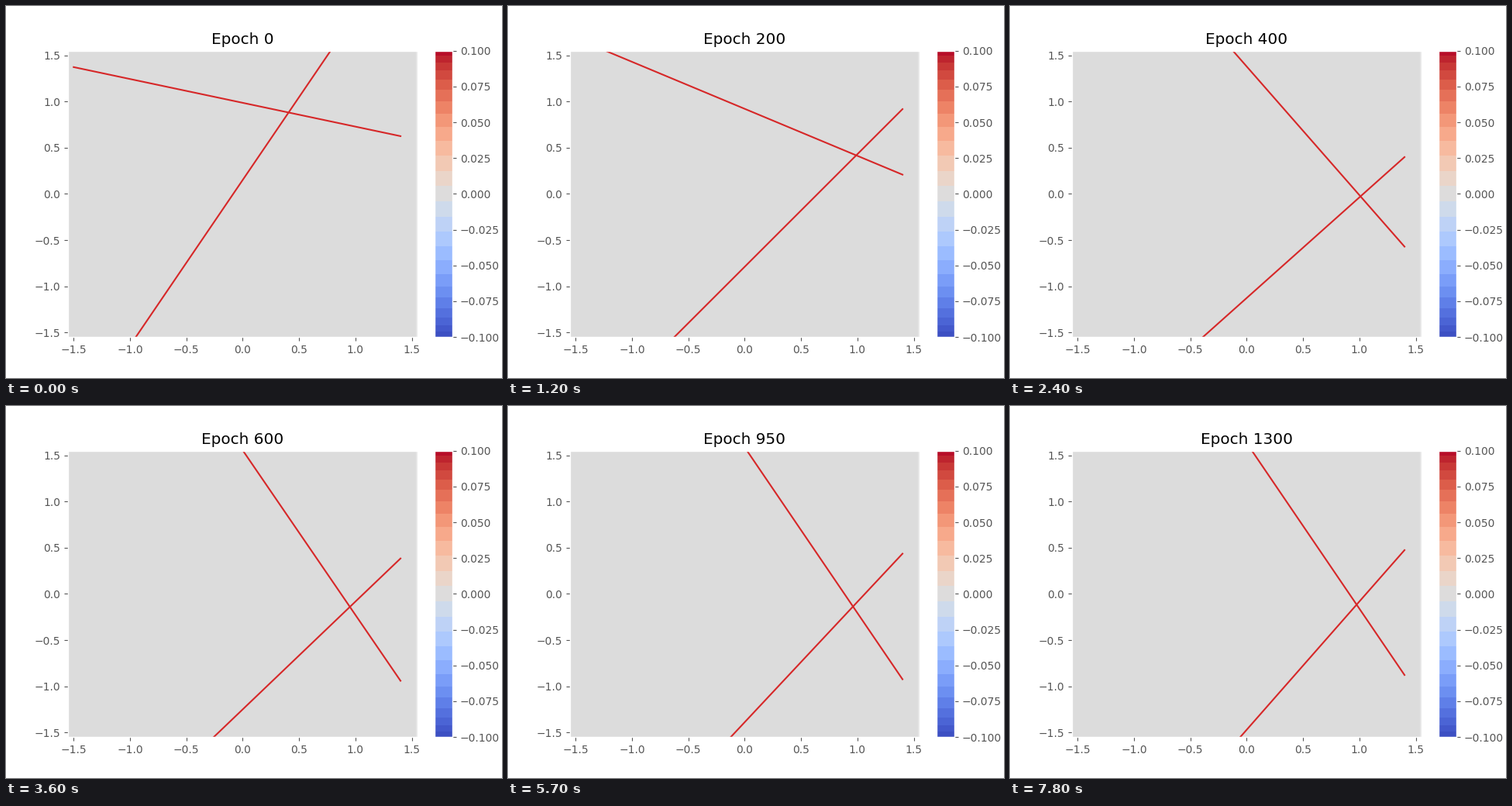
A matplotlib script that plays this animation: 640x480 px, repeating every 8000 ms.

```python
import matplotlib.pyplot as plt
import numpy as np
from matplotlib.animation import FuncAnimation

WIDTH, HEIGHT = 640, 480
INTERVAL, FRAMES = 100, 80
FRAMES_PER_STEP, EPOCHS_PER_STEP = 3, 50
LIMIT = 1.55
GREY = "#555555"

plt.rcParams.update({
    "font.family": "DejaVu Sans",
    "font.size": 10,
    "axes.titlesize": "x-large",
    "axes.facecolor": "#e5e5e5",
    "axes.edgecolor": "white",
    "axes.linewidth": 1,
    "xtick.color": GREY,
    "ytick.color": GREY,
})


def fade(epoch, scale, power=1):
    """Stretched exponential decay from 1 to 0."""
    return np.exp(-(epoch / scale) ** power)


def line_through(root, degrees):
    """Line that crosses y = 0 at root with the given angle."""
    return np.tan(np.radians(degrees)) * (xs - root)


def falling_line(epoch):
    root = 0.814 + 7.4e-5 * epoch + 3.01 * fade(epoch, 184.5, 1.43)
    angle = -60.85 + 46.4 * fade(epoch, 310, 2.64)
    return line_through(root, angle)


def rising_line(epoch):
    root = 1.085 - 2e-5 * epoch - 1.169 * fade(epoch, 201, 1.74)
    angle = 56.45 - 19.3 * fade(epoch, 600) + 23.7 * fade(epoch, 190, 1.59)
    return line_through(root, angle)


def add_axes(left, right, top=57.6, bottom=427.2):
    return fig.add_axes([left / WIDTH, 1 - bottom / HEIGHT,
                         (right - left) / WIDTH, (bottom - top) / HEIGHT])


def draw_colorbar():
    bar = add_axes(553.18, 576)
    # Bands are wide around zero and narrow towards both ends.
    u = np.linspace(-1, 1, 26)
    levels = 0.1 * (0.4 * u + 0.6 * np.sin(u * np.pi / 2))
    cmap = plt.get_cmap("coolwarm")
    for low, high in zip(levels, levels[1:]):
        bar.axhspan(low, high, color=cmap((low + high) / 0.4 + 0.5), lw=0)
    bar.set(xlim=(0, 1), ylim=(-0.1, 0.1), xticks=[],
            yticks=np.linspace(-0.1, 0.1, 9))
    bar.yaxis.set_major_formatter("{x:.3f}")
    bar.yaxis.tick_right()


fig = plt.figure(figsize=(WIDTH / 100, HEIGHT / 100), dpi=100,
                 facecolor="white")
ax = add_axes(80, 530.86)
ax.fill_between([-LIMIT, 1.54], -LIMIT, 1.54, color="#dcdcdc", lw=0)
ticks = np.linspace(-1.5, 1.5, 7)
ax.set(xlim=(-LIMIT, LIMIT), ylim=(-LIMIT, LIMIT), xticks=ticks, yticks=ticks)
draw_colorbar()

xs = np.linspace(-1.5, 1.4, 30)
boundaries = (falling_line, rising_line)
lines = [ax.plot([], [], color="tab:red", lw=1.5)[0] for _ in boundaries]
title = ax.set_title("")


def update(frame):
    epoch = frame // FRAMES_PER_STEP * EPOCHS_PER_STEP
    title.set_text(f"Epoch {epoch}")
    for line, boundary in zip(lines, boundaries):
        line.set_data(xs, boundary(epoch))
    return [title, *lines]


animation = FuncAnimation(fig, update, frames=FRAMES, interval=INTERVAL,
                          repeat=True, repeat_delay=0)
plt.show()
```
